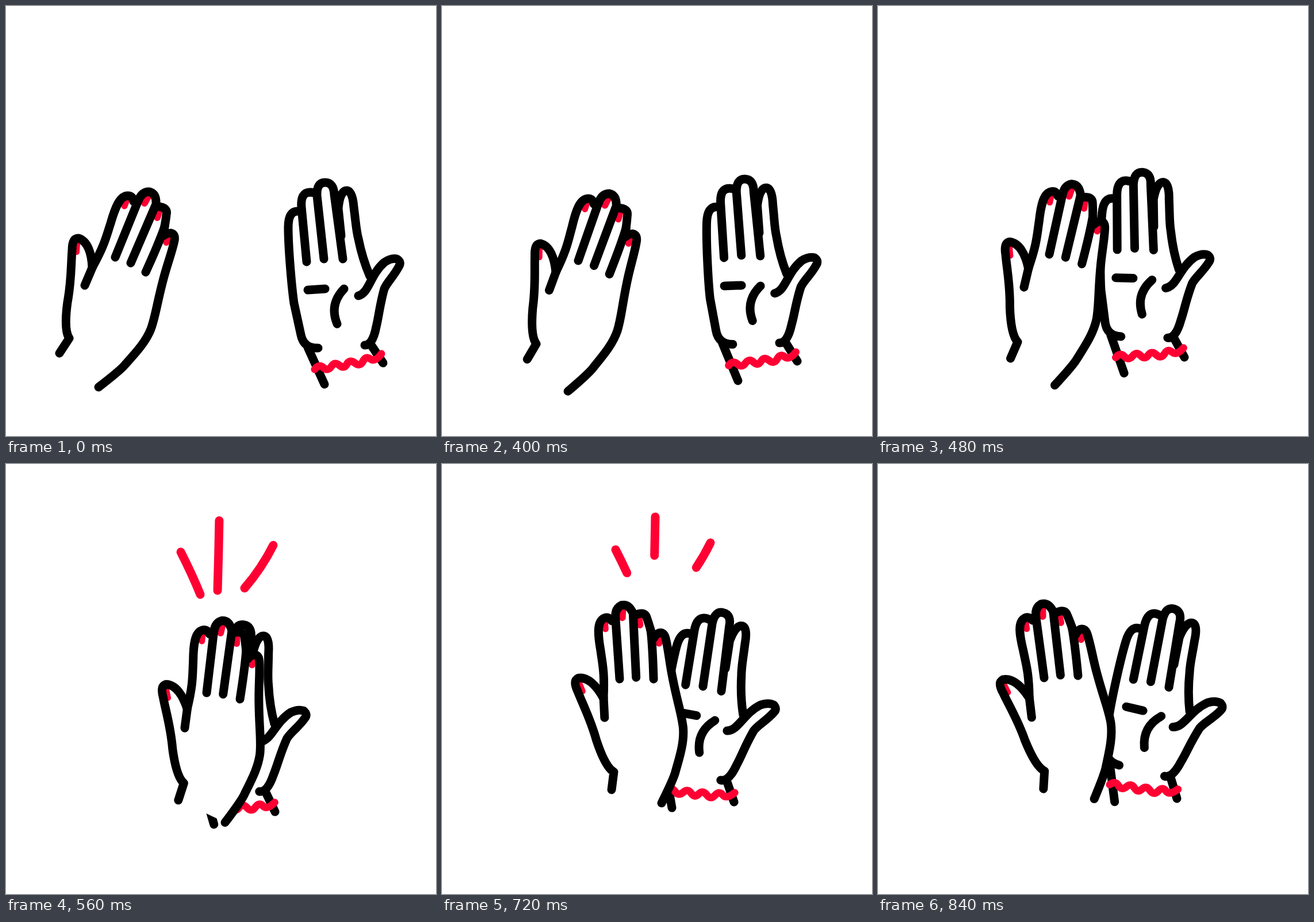
These frames come from a looping animation (748 by 748 pixels, 1.04 s). An HTML page:

```html
<!DOCTYPE html>
<html lang="en">
<head>
<meta charset="utf-8">
<title>Clapping hands</title>
<style>
  html, body { margin: 0; width: 100%; height: 100%; overflow: hidden; background: #fff; }
  svg { display: block; width: 100%; height: 100%; }
  path { fill: none; stroke: #000; stroke-width: 15; stroke-linecap: round; stroke-linejoin: round; }
  .red path { stroke: #ff0033; }
  .skin { fill: #fff; }
</style>
</head>
<body>
<svg viewBox="0 0 748 748">
  <g id="palm">
    <path d="M543 595 Q518 596 513 572 L501 517 C497 490 491 420 491 385 Q491 356 508 357"/>
    <path d="M523 445 L514 350 Q512 324 529 324 L538 325"/>
    <path d="M553 440 L541 330 Q540 307 555 307 Q570 307 571 328 L576 365 L586 440"/>
    <path d="M583 400 L578 352 Q581 321 593 321 Q603 322 605 350 C609 380 609 390 613 405 Q620 440 633 470"/>
    <path d="M613 504 C632 499 633 468 658 446 Q670 438 680 440 Q688 445 684 452 C675 470 663 480 658 492 C650 520 649 538 644 558 Q638 590 624 590"/>
    <path d="M525 594 L554 658 M634 588 L656 621"/>
    <path d="M525 494 L555 492 M588 492 Q562 519 576 553"/>
    <g class="red">
      <path stroke-width="13" style="stroke-width:13" d="M537 632 Q544 622 552 629 T566 627 T580 625 T593 623 T607 621 T621 618 T634 614 T653 605"/>
    </g>
  </g>
  <g id="back">
    <path class="skin" style="stroke:none" d=""/>
    <g class="red" style="stroke-linecap:round">
      <path style="stroke-width:11" d="M211 335 L206 348"/>
      <path style="stroke-width:12" d="M247 332 L241 343"/>
      <path style="stroke-width:12" d="M266 358 L263 368"/>
      <path style="stroke-width:12" d="M282 402 L279 411"/>
      <path style="stroke-width:10" d="M124 413 L123 428"/>
    </g>
    <path id="outline" d="M93 604 L110 578 C102 566 104 537 107 515 C114 478 113 448 115 425 C115 408 120 404 126 404 C142 409 149 430 150 455 C172 415 174 402 182 378 C190 350 198 330 212 330 Q220 330 222 340 L230 339 Q236 323 249 323 Q262 326 261 345 L264 349 Q282 350 279 363 Q277 380 274 392 L275 399 Q279 395 287 395 Q295 397 293 408 C289 428 280 450 273 478 C262 520 260 540 252 562 C243 585 225 604 207 624 Q200 633 161 663"/>
    <path d="M137 486 L151 453 M190 437 L229 341 M217 447 L260 347 M243 463 Q267 410 276 384"/>
  </g>
  <g id="rays" class="red">
    <path pathLength="100" d="M338 227 Q324 192 302 149"/>
    <path pathLength="100" d="M368 220 Q370 156 371 92"/>
    <path pathLength="100" d="M415 216 Q446 180 467 137"/>
  </g>
</svg>
<script>
const $ = id => document.getElementById(id);
const clamp = (v, lo, hi) => Math.min(hi, Math.max(lo, v));
const LOOP = 1040, STEP = 40;
const times = [360, 400, 480, 560, 600, 720, 840];

// Each hand turns about its pivot while the pivot travels.
const hands = [
  { node: $('back'), pivot: [190, 437],
    x: [190, 237, 298, 349, 357, 309, 289],
    y: [437, 443, 432, 398, 386, 374, 372],
    turn: [0, -2.8, -9.7, -15.4, -18.3, -26, -29.8] },
  { node: $('palm'), pivot: [656, 621],
    x: [656, 618, 533, 468, 464, 508, 520],
    y: [621, 618, 611, 605, 601, 588, 582],
    turn: [0, 1.8, 5.1, 8.3, 9.9, 14.6, 17] }
];

$('back').querySelector('.skin').setAttribute('d', $('outline').getAttribute('d') + 'Z');

function slope(values, i) {
  const a = Math.max(i - 1, 0), b = i + 1;
  return b < times.length ? (values[b] - values[a]) / (times[b] - times[a]) : 0;
}

// Cubic Hermite curve through the keyed values.
function sample(values, t) {
  t = clamp(t, times[0], times[times.length - 1]);
  const i = Math.max(0, times.findIndex(k => k >= t) - 1);
  const span = times[i + 1] - times[i], u = (t - times[i]) / span, v = 1 - u;
  return v * v * (1 + 2 * u) * values[i] + u * u * (3 - 2 * u) * values[i + 1]
    + span * u * v * (v * slope(values, i) - u * slope(values, i + 1));
}

function draw(t) {
  for (const { node, pivot, x, y, turn } of hands) {
    node.setAttribute('transform',
      `translate(${sample(x, t)} ${sample(y, t)}) rotate(${sample(turn, t)}) translate(${-pivot[0]} ${-pivot[1]})`);
  }
  const start = clamp((t - 600) / 240 * 95, 0, 100);
  const end = clamp((t - 480) / 80 * 95, 0, 100);
  const rays = $('rays');
  rays.style.display = t > 480 && t < 840 ? '' : 'none';
  rays.setAttribute('stroke-dasharray', `${end - start} 300`);
  rays.setAttribute('stroke-dashoffset', -start);
}

const origin = performance.now();
function tick() {
  const t = (performance.now() - origin) % LOOP;
  draw(Math.floor(t / STEP) * STEP);
  requestAnimationFrame(tick);
}
tick();
</script>
</body>
</html>
```
